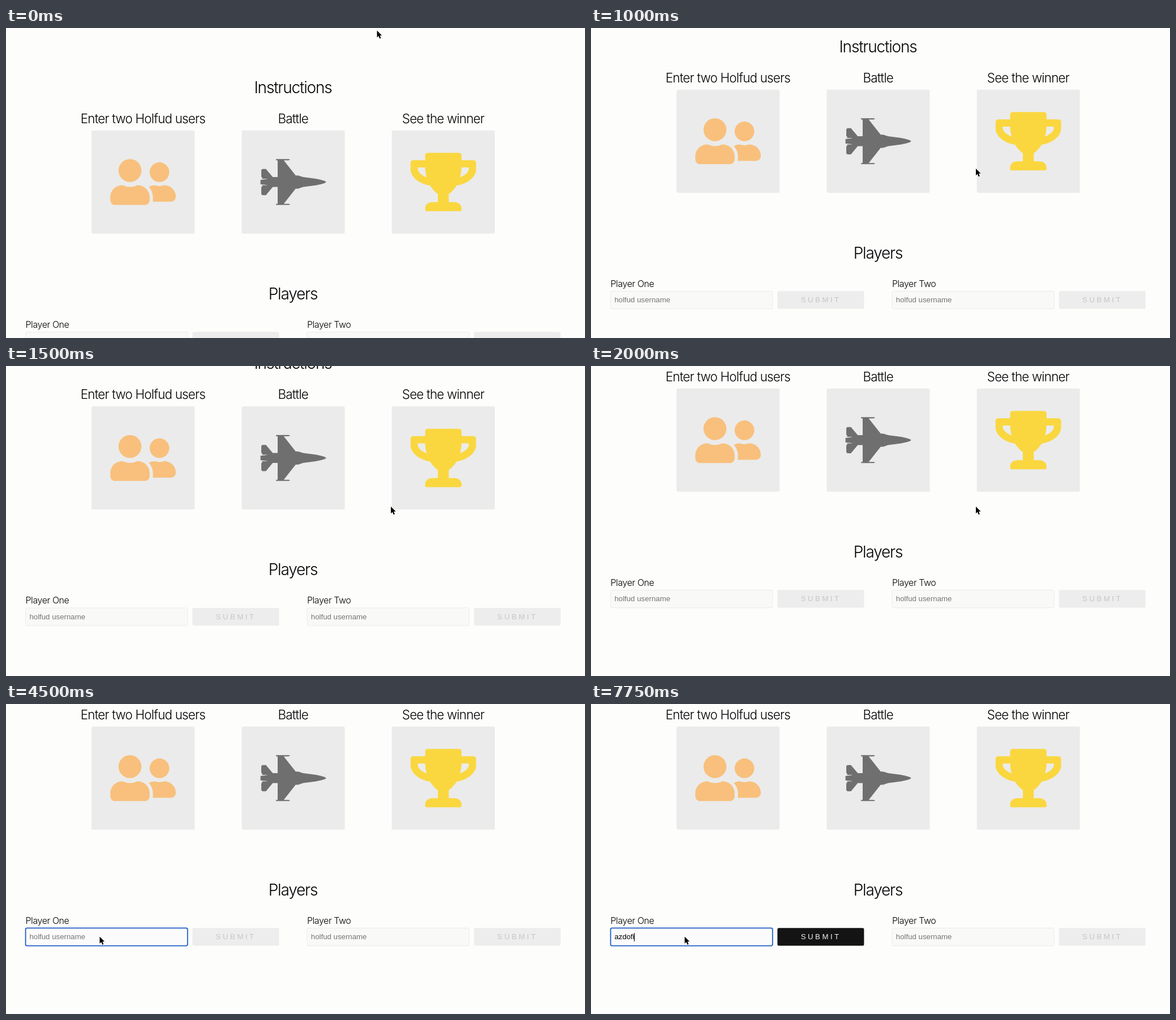
Recreate the animation shown at these times as an HTML page. Size 1023 by 547 pixels, loop 8 s.

```html
<!DOCTYPE html>
<html lang="en">
<head>
<meta charset="utf-8">
<title>Battle</title>
<style>
  html, body { margin: 0; width: 100%; height: 100%; overflow: hidden; background: #fdfdfc; }
  svg { display: block; }
  text { font-family: Inter, Roboto, sans-serif; font-weight: 300; font-optical-sizing: none; fill: #000; }
  .lg { font-size: 28px; letter-spacing: -.042em; text-anchor: middle; }
  .sm { font-size: 22.4px; letter-spacing: -.036em; text-anchor: middle; }
  .label { font-size: 16px; letter-spacing: -.027em; }
  .field, .btn { font: 400 13.25px "Liberation Sans", Arial, sans-serif; }
  .hint { fill: #757575; }
  .btn { letter-spacing: 3.5px; fill: #c6c6c8; text-anchor: middle; }
  .card { fill: #ebebeb; }
  .input { fill: #f9f9f8; stroke: #ebebe8; }
  .button { fill: #ededed; }
  .focus .input { fill: #fbfbfb; stroke: #1f5fc6; stroke-width: 1.8px; }
  .ready .button { fill: #141414; }
  .ready .btn { fill: #f0f0f0; }
</style>
</head>
<body>
<svg width="1023" height="547" viewBox="0 0 1023 547">
  <g id="page">
    <text class="lg" x="507" y="114.5">Instructions</text>
    <text class="lg" x="507" y="478.5">Players</text>
  </g>
  <path id="cursor" d="M0 0V12.2L2.8 9.6L4.8 14.2L6.9 13.3L5 8.8H8.7Z" fill="#000" stroke="#fff" stroke-width="1.1" paint-order="stroke"/>
</svg>
<script>
const LOOP = 8000;
const page = document.getElementById('page');
const cursor = document.getElementById('cursor');

function add(parent, tag, attrs, text = '') {
  const node = document.createElementNS('http://www.w3.org/2000/svg', tag);
  for (const key in attrs) node.setAttribute(key, attrs[key]);
  node.textContent = text;
  return parent.appendChild(node);
}

const users = 'M192 256a112 112 0 1 0 0-224a112 112 0 1 0 0 224z' +
  'm76.8 32h-8.3c-20.8 10-43.9 16-68.5 16s-47.6-6-68.5-16h-8.3C51.6 288 0 339.6 0 403.2V432' +
  'c0 26.5 21.5 48 48 48h288c26.5 0 48-21.5 48-48v-28.8c0-63.6-51.6-115.2-115.2-115.2z' +
  'M480 256a96 96 0 1 0 0-192a96 96 0 1 0 0 192z' +
  'm48 32h-3.8c-13.9 4.8-28.6 8-44.2 8s-30.3-3.2-44.2-8H432c-20.4 0-39.2 5.9-55.7 15.4' +
  'c24.4 26.3 39.7 61.2 39.7 99.8v38.4c0 2.2-.5 4.3-.6 6.4H592c26.5 0 48-21.5 48-48c0-61.9-50.1-112-112-112z';

const jetHalf = 'M0 256V234.7L64 226.7V224H16V208H8V138.7L18.7 128H53.3L120 208H168V44H152V32H266.7' +
  'C278 32 288 34.6 288 38S278 44 266.7 44H227L344 192H368L416 208L544 224C640 245 640 251 640 256z';

const trophy = 'M552 64H448V24c0-13.3-10.7-24-24-24H152c-13.3 0-24 10.7-24 24v40H24C10.7 64 0 74.7 0 88v56' +
  'c0 35.7 22.5 72.4 61.9 100.7c31.5 22.7 69.8 37.1 110 41.7C203.3 338.5 240 360 240 360v72h-48' +
  'c-35.3 0-64 20.7-64 56v12c0 6.6 5.4 12 12 12h296c6.6 0 12-5.4 12-12v-12c0-35.3-28.7-56-64-56h-48v-72' +
  's36.7-21.5 68.1-73.6c40.3-4.6 78.6-19 110-41.7c39.3-28.3 61.9-65 61.9-100.7V88c0-13.3-10.7-24-24-24z' +
  'M99.3 192.8C74.9 175.2 64 155.6 64 144v-16h64.2c1 32.6 5.8 61.2 12.8 86.2c-15.1-5.2-29.2-12.4-41.7-21.4z' +
  'M512 144c0 16.1-17.7 36.1-35.3 48.8c-12.5 9-26.7 16.2-41.8 21.4c7-25 11.8-53.6 12.8-86.2H512v16z';

function card(x, title, color, width, draw) {
  add(page, 'text', { class: 'sm', x: x + 90.7, y: 167.6 }, title);
  add(page, 'rect', { class: 'card', x, y: 180.8, width: 182, height: 182, rx: 2.5 });
  const scale = 115.8 / width;
  const icon = add(page, 'g', {
    fill: color,
    transform: `translate(${x + 33.1} ${271.8 - 256 * scale}) scale(${scale})`
  });
  draw(icon);
}

card(151.2, 'Enter two Holfud users', '#f8c07c', 640, g => add(g, 'path', { d: users }));
card(416.5, 'Battle', '#6f6f6f', 640, g => {
  add(g, 'path', { d: jetHalf });
  add(g, 'path', { d: jetHalf, transform: 'matrix(1 0 0 -1 0 512)' });
  add(g, 'rect', { x: 8, y: 250, width: 620, height: 12 });
});
card(681.7, 'See the winner', '#fad73f', 576, g => add(g, 'path', { d: trophy }));

function player(x, label) {
  const group = add(page, 'g', { transform: `translate(${x} 0)` });
  add(group, 'text', { class: 'label', x: -.5, y: 528.8 }, label);
  add(group, 'rect', { class: 'input', x: -.4, y: 536.4, width: 286.2, height: 31.2, rx: 2.5 });
  add(group, 'rect', { class: 'button', x: 294.4, y: 536.2, width: 153, height: 31.4, rx: 2.5 });
  add(group, 'text', { class: 'btn', x: 371.2, y: 556.3 }, 'SUBMIT');
  const field = add(group, 'text', { class: 'field hint', x: 6.4, y: 556.3 }, HINT);
  return { group, field };
}

const HINT = 'holfud username';
const NAME = 'azdofi';
const one = player(35, 'Player One');
player(532.4, 'Player Two');
const caret = add(one.group, 'rect', { y: 545, width: 1, height: 15, fill: '#000' });

// [time, value...]: each value holds until the next row
const scroll = [[0, 0], [250, 43], [1000, 72], [1250, 96], [1500, 109.5], [1750, 137], [2000, 141]];
const pointer = [
  [0, 655.5, 4.5], [250, 670, 116], [500, 680, 248], [2500, 588, 279.5],
  [2750, 220, 362.5], [3000, 187, 397], [3250, 165, 411.5], [3500, 165.5, 410.5]
];
const typed = [[0, 0], [7000, 1], [7250, 3], [7500, 5], [7750, 6]];
const FOCUS = 4000;
const BLINK = 500;

const at = (steps, t) => steps.findLast(step => step[0] <= t);

function render(t) {
  page.setAttribute('transform', `translate(0 ${-at(scroll, t)[1]})`);
  const [, x, y] = at(pointer, t);
  cursor.setAttribute('transform', `translate(${x} ${y})`);

  const count = at(typed, t)[1];
  const focused = t >= FOCUS;
  one.group.setAttribute('class', (focused ? 'focus ' : '') + (count ? 'ready' : ''));
  one.field.setAttribute('class', count ? 'field' : 'field hint');
  one.field.textContent = count ? NAME.slice(0, count) : HINT;

  const lit = count > 0 || Math.floor((t - FOCUS) / BLINK) % 2 === 0;
  caret.setAttribute('visibility', focused && lit ? 'visible' : 'hidden');
  caret.setAttribute('x', 6 + (count ? Math.round(one.field.getComputedTextLength()) : 0));
}

const start = performance.now();
function tick() {
  render((performance.now() - start) % LOOP);
  requestAnimationFrame(tick);
}
tick();
</script>
</body>
</html>
```
